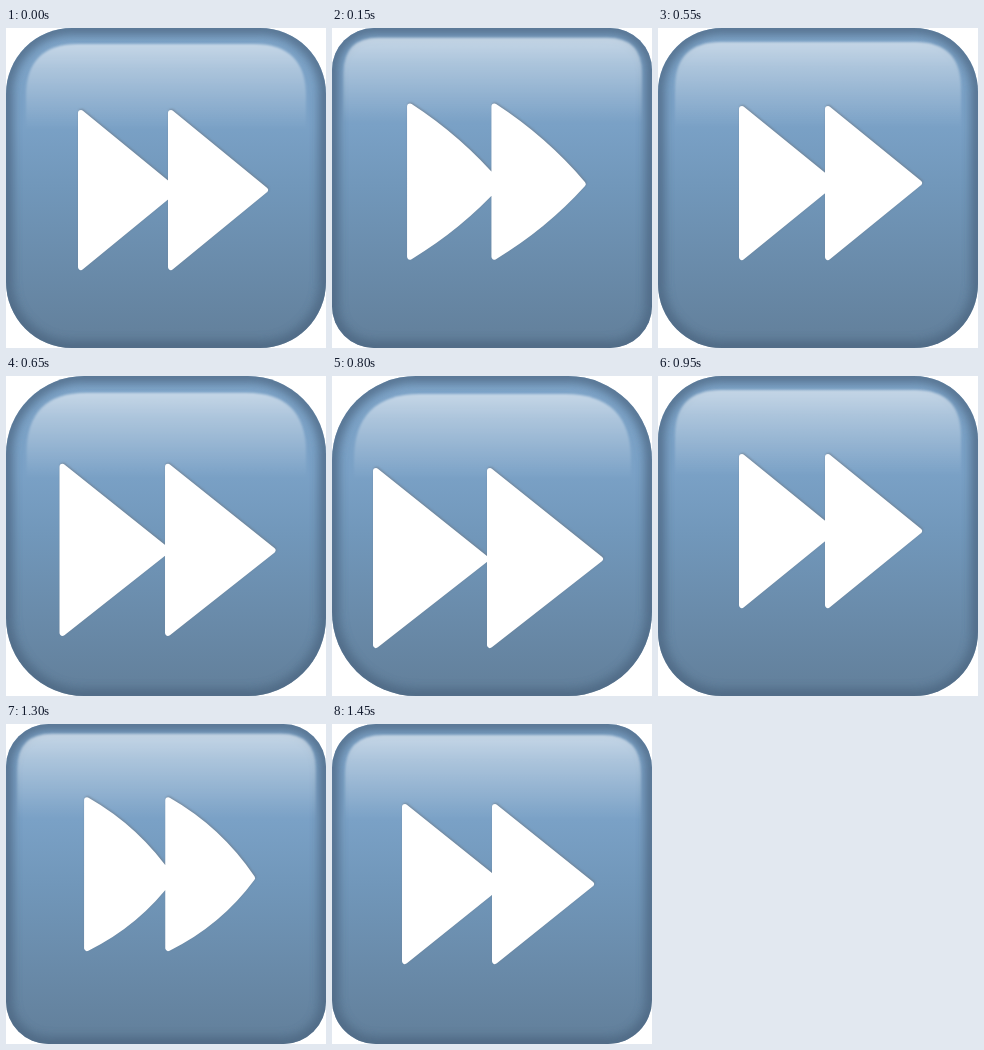
Recreate the animation shown at these times as an HTML page. Size 320x320 px, loop 1.5 s.

```html
<!DOCTYPE html>
<html lang="en">
<head>
<meta charset="utf-8">
<title>Fast forward</title>
<style>
  html, body { margin: 0; width: 100%; height: 100%; overflow: hidden; background: #fff; }
  svg { display: block; width: 100vw; height: 100vh; }
</style>
</head>
<body>
<svg viewBox="0 0 320 320">
  <defs>
    <linearGradient id="base" x1="0" y1="0" x2="0" y2="1">
      <stop offset="0" stop-color="#7fa5c9"/>
      <stop offset=".3" stop-color="#7aa1c6"/>
      <stop offset=".5" stop-color="#7197ba"/>
      <stop offset="1" stop-color="#627f9a"/>
    </linearGradient>
    <linearGradient id="shine" x1="0" y1="0" x2="0" y2="1">
      <stop offset="0" stop-color="#fff" stop-opacity=".55"/>
      <stop offset=".3" stop-color="#fff" stop-opacity=".36"/>
      <stop offset="1" stop-color="#fff" stop-opacity="0"/>
    </linearGradient>
    <filter id="soft" x="-10%" y="-10%" width="120%" height="120%"><feGaussianBlur stdDeviation="5"/></filter>
    <filter id="haze"><feGaussianBlur stdDeviation="1"/></filter>
    <clipPath id="tile"><rect class="tile"/></clipPath>
  </defs>
  <rect class="tile" fill="url(#base)"/>
  <g clip-path="url(#tile)">
    <rect class="tile" fill="none" stroke="#48647f" stroke-width="14" opacity=".75" filter="url(#soft)"/>
    <path id="gloss" fill="url(#shine)" filter="url(#haze)"/>
  </g>
  <g stroke-width="6" stroke-linejoin="round">
    <path class="arrows" fill="#6d7c8b" stroke="#6d7c8b" opacity=".7" transform="translate(.7 -1)" filter="url(#haze)"/>
    <path class="arrows" fill="#fff" stroke="#fff"/>
  </g>
</svg>
<script>
const STEP = 50, LOOP = 1500;

// step, left, second left, top, bottom, tip x, tip y, bulge, tile radius, gloss left, gloss right, gloss top, gloss radius
const half = [
  [0, 72, 162, 82, 242, 262, 162, 0, 66, 20, 300, 16, 52],
  [1, 70, 160, 80, 240, 262, 160, 0, 44, 13, 309, 11, 38],
  [7, 85, 160, 69, 218, 241, 150, 11, 48, 12, 308, 10, 36],
  [11, 81, 167, 78, 232, 264, 155, 0, 64, 17, 303, 14, 46],
  [14, 41, 155, 92, 272, 271, 183, 0, 84, 22, 299, 18, 66]
];
const flip = (k, at) => [at - k[0], ...k.slice(1)];
// the second half of the loop mirrors the first
const keys = [flip(half[1], 0), ...half, flip(half[4], 30), flip(half[3], 30)];

function pose(n) {
  const s = n > 15 ? 30 - n : n;
  let i = 1;
  while (s > keys[i + 1][0]) i++;
  const [p, a, b, q] = keys.slice(i - 1, i + 3);
  const h = b[0] - a[0], u = (s - a[0]) / h;
  return a.slice(1).map((v, j) => {
    const c = j + 1;
    const m = (b[c] - p[c]) / (b[0] - p[0]) * h;
    const w = (q[c] - v) / (q[0] - a[0]) * h;
    const d = b[c] - v;
    return v + u * m + u * u * (3 * d - 2 * m - w) + u * u * u * (m + w - 2 * d);
  });
}

// quadratic edge pushed outwards from its chord
function edge(x0, y0, x1, y1, bulge) {
  const dx = x1 - x0, dy = y1 - y0, k = 2 * bulge / Math.hypot(dx, dy);
  return `Q${(x0 + x1) / 2 + dy * k} ${(y0 + y1) / 2 - dx * k} ${x1} ${y1}`;
}

function triangle(x, top, bottom, tipX, tipY, bulge) {
  return `M${x} ${top}${edge(x, top, tipX, tipY, bulge)}${edge(tipX, tipY, x, bottom, bulge)}Z`;
}

const tiles = document.querySelectorAll('.tile');
const arrows = document.querySelectorAll('.arrows');
const gloss = document.getElementById('gloss');
for (const t of tiles) {
  t.setAttribute('width', 320);
  t.setAttribute('height', 320);
}

function draw(time) {
  const [x1, x2, top, bottom, tipX, tipY, rawBulge, r, gl, gr, gt, gRad] =
    pose(Math.floor(time % LOOP / STEP));
  const bulge = Math.max(0, rawBulge);
  for (const t of tiles) t.setAttribute('rx', r);
  gloss.setAttribute('d', `M${gl} ${gt + 85}V${gt + gRad}Q${gl} ${gt} ${gl + gRad} ${gt}H${gr - gRad}Q${gr} ${gt} ${gr} ${gt + gRad}V${gt + 85}Z`);
  const d = [x1, x2].map(x =>
    triangle(x + 3, top + 3, bottom - 3, tipX - x2 + x - 3, tipY, bulge)).join('');
  for (const a of arrows) a.setAttribute('d', d);
}

const start = performance.now();
function tick() {
  draw(performance.now() - start);
  requestAnimationFrame(tick);
}
tick();
</script>
</body>
</html>
```
